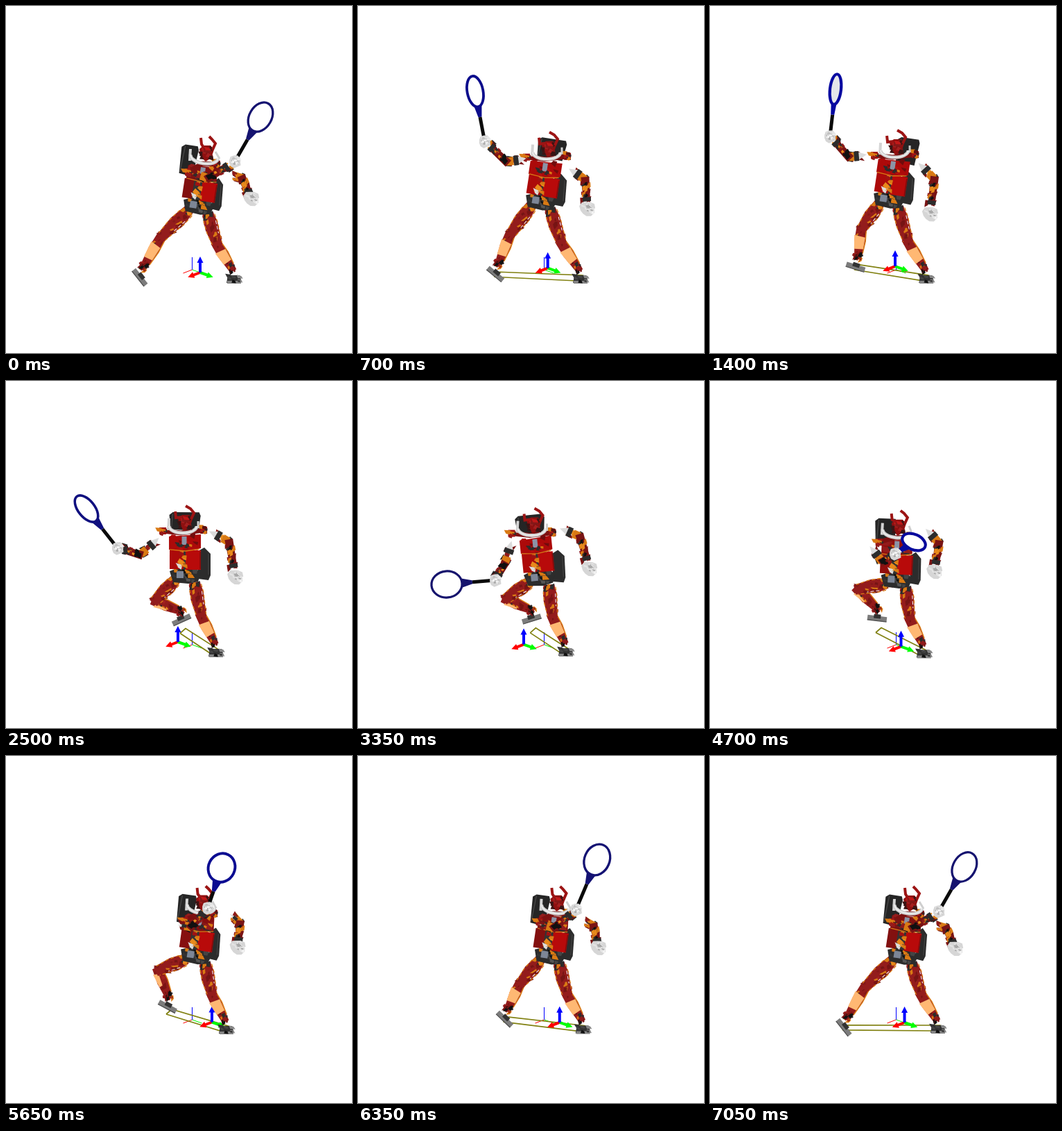
Animation, 499 px wide and 500 px high, one loop 7.1 s. Source, as an HTML page with a canvas:

```html
<!DOCTYPE html>
<html>
<head>
<meta charset="utf-8">
<style>
html, body { margin: 0; width: 100%; height: 100%; overflow: hidden; background: #fff; }
canvas { display: block; }
</style>
</head>
<body>
<canvas id="stage" width="499" height="500"></canvas>
<script>
const ctx = document.getElementById('stage').getContext('2d');
const LOOP = 7100, STEP = 50;
const mix = (a, b, k) => a + (b - a) * k;
const clamp = k => Math.max(0, Math.min(1, k));
const wave = (t, peak, period = LOOP) => Math.cos((t - peak) / period * 2 * Math.PI);
const add = (p, x, y) => [p[0] + x, p[1] + y];
const lerp = (p, q, k) => [mix(p[0], q[0], k), mix(p[1], q[1], k)];

// Periodic monotone spline through keys of [time, ...values].
function track(...keys) {
  const n = keys.length;
  const key = i => keys[(i + n) % n];
  const time = i => key(i)[0] + LOOP * Math.floor(i / n);
  const rate = (i, c) => (key(i + 1)[c] - key(i)[c]) / (time(i + 1) - time(i));
  const slope = (i, c) => {
    const a = rate(i - 1, c), b = rate(i, c);
    return a * b <= 0 ? 0 : 2 * a * b / (a + b);
  };
  return t => {
    let i = n - 1;
    while (keys[i][0] > t) i--;
    const d = time(i + 1) - time(i), k = (t - time(i)) / d;
    return keys[i].slice(1).map((v, j) =>
      mix(v, key(i + 1)[j + 1], k * k * (3 - 2 * k)) +
      d * k * (1 - k) * ((1 - k) * slope(i, j + 1) - k * slope(i + 1, j + 1)));
  };
}

// The few driven points; every other joint follows from them.
const pelvisAt = track([0, 276, 288], [1100, 256, 279], [2500, 257, 280], [4000, 264, 286]);
const leanAt = track([0, 12], [1400, 12], [3350, -8], [5650, 11]);
const sideAt = track([0, -25], [1100, 18], [2500, 1], [3350, -4], [5500, -23]);
const shoulderAt = track([0, 266, 240], [1100, 220, 214], [2500, 215, 232], [4700, 236, 244]);
const fistAt = track([0, 354, 277], [1200, 317, 300], [2500, 331, 282], [3350, 334, 270], [4700, 324, 274]);
const handAt = track([0, 330, 224], [650, 184, 196], [1400, 173, 188], [2500, 161, 241],
  [3350, 198, 287], [4700, 267, 249], [5650, 291, 219]);
const aimAt = track([0, 37, -64], [650, -14, -72], [1400, 8, -68], [2500, -45, -57],
  [3350, -70, 6], [3850, 14, 26], [4700, 27, -17], [5650, 20, -58], [6400, 31, -72]);
const minorAt = track([0, 16], [1400, 8], [2500, 12], [3350, 19], [4700, 11], [5650, 19]);
const footLAt = track([0, 193, 391], [1400, 210, 376], [2500, 253, 344], [4700, 241, 342], [5650, 233, 361]);
const footRAt = track([0, 329, 394], [1200, 314, 394], [3350, 300, 391], [5650, 318, 395]);
const tiltAt = track([0, .9], [1400, .3], [2500, -.43], [4700, .12]);
const massAt = track([0, 280], [1400, 267], [3350, 239], [5650, 297]);

// Knee of a leg with two equal bones, bending towards screen left.
function knee(hip, ankle) {
  const dx = ankle[0] - hip[0], dy = ankle[1] - hip[1], d = Math.hypot(dx, dy);
  const bone = Math.max(45, d * .505), h = Math.sqrt(bone * bone - d * d / 4);
  return add(lerp(hip, ankle, .5), -dy / d * h, dx / d * h);
}

function pose(t) {
  const pelvis = pelvisAt(t), head = add(pelvis, leanAt(t)[0], -78);
  const side = sideAt(t)[0], front = clamp((side + 25) / 20);
  const armR = add(head, 42 - 5 * wave(t, 450), 21 + 14 * wave(t, 450));
  const armL = shoulderAt(t), hand = handAt(t), fist = fistAt(t);
  const reach = Math.hypot(hand[0] - armL[0], hand[1] - armL[1]);
  const sag = 15 * Math.abs(hand[0] - armL[0]) / reach;
  const footL = footLAt(t), footR = footRAt(t);
  const lift = Math.max(0, 375 - footL[1]) / 2;
  return {
    pelvis, head, side, front, armL, armR, hand, fist, footL, footR,
    elbowL: add(lerp(armL, hand, .4), 0, sag),
    elbowR: add(lerp(armR, fist, .3), (fist[1] - armR[1]) * .2, (armR[0] - fist[0]) * .2),
    hipL: add(pelvis, -11, 5), hipR: add(pelvis, 15, 10),
    ankleL: add(footL, 3, -11), ankleR: add(footR, -1, -12),
    tilt: tiltAt(t)[0],
    mass: [massAt(t)[0], pelvis[1] + 96],
    area: [add(footL, -2, lift + 4), add(footL, 6, lift - 3), add(footR, 2, -6), add(footR, -6, 2)],
    aim: aimAt(t), minor: minorAt(t)[0],
    bright: .5 + .5 * wave(t, 1450, LOOP / 2)
  };
}

function rng(seed) {
  return () => (seed = (seed * 16807 + 11) % 2147483647) / 2147483647;
}

function poly(color, ...pts) {
  ctx.fillStyle = color;
  ctx.beginPath();
  pts.forEach(p => ctx.lineTo(...p));
  ctx.fill();
}

function line(color, width, ...pts) {
  ctx.strokeStyle = color;
  ctx.lineWidth = width;
  ctx.beginPath();
  pts.forEach(p => ctx.lineTo(...p));
  ctx.stroke();
}

function box(color, x, y, rx, ry) {
  ctx.fillStyle = color;
  ctx.fillRect(x - rx, y - ry, 2 * rx, 2 * ry);
}

function within(p, angle, paint) {
  ctx.save();
  ctx.translate(...p);
  ctx.rotate(angle);
  paint();
  ctx.restore();
}

// Runs paint(length) with the x axis along the bone.
function bone(a, b, paint) {
  const dx = b[0] - a[0], dy = b[1] - a[1];
  within(a, Math.atan2(dy, dx), () => paint(Math.hypot(dx, dy)));
}

// Small mesh facets scattered over a box.
function chips(x, y, rx, ry, count, seed, colors, size = 5) {
  const r = rng(seed * 7919);
  r();
  for (let i = 0; i < count; i++) {
    const cx = x + mix(-rx, rx, r()), cy = y + mix(-ry, ry, r()), s = size * (.5 + r() * .8);
    poly(colors[Math.floor(r() * colors.length)],
      [cx - s * r(), cy - s / 2], [cx + s / 2, cy - s * r() / 2],
      [cx + s * r(), cy + s / 2], [cx - s / 2, cy + s * r() / 2]);
  }
}

const RED = '#931c1c', ORANGE = '#d97a14', DARK = '#2c2c2c', PEACH = '#ffb873';
const REDS = [RED, '#761414', '#a32020', '#841818'];
const LEG = [...REDS, ...REDS, ORANGE, DARK];
const JOINT = [DARK, '#111', ORANGE, '#e88a1c', '#7a1414', '#8f1b1b'];
const BLACKS = ['#111', '#333', '#444', '#555'];

function thigh(hip, end, seed) {
  bone(hip, end, len => {
    poly(RED, [0, -7], [len * .3, -10], [len + 3, -8], [len + 4, 6], [len * .5, 10], [0, 8]);
    chips(len / 2, 0, len * .48, 8, 18, seed, LEG, 6);
    ctx.setLineDash([5, 3]);
    line(ORANGE, 1.3, [4, -9], [len * .35, -10], [len, -8]);
    line(ORANGE, 1.3, [len * .2, 9], [len * .6, 9], [len, 6]);
    line('#fff', 1, [len * .3, -8], [len * .7, -7]);
    ctx.setLineDash([]);
    chips(0, 0, 6, 6, 10, seed + 1, JOINT);
  });
}

// The light shin plate turns edge-on as the leg folds (bent: 0 to 1).
function shin(top, ankle, seed, bent) {
  bone(top, ankle, len => {
    poly(RED, [-4, -7], [len * .35, -8], [len, -5], [len, 5], [len * .4, 8], [-4, 7]);
    chips(len / 2, 0, len / 2, 6, 20, seed, [...LEG, ...JOINT]);
    line(ORANGE, 1.5, [0, -7], [len * .4, -8], [len * .8, -6]);
    const from = mix(.28, .08, bent), low = mix(-7, 4, bent);
    poly(PEACH, [len * from, low], [len * (from + .38), low + 1],
      [len * (from + .4), 7], [len * from - 2, 9]);
    chips(len * .88, 0, len * .12, 5, 9, seed + 2, JOINT);
  });
}

function leg(hip, ankle, seed) {
  const k = knee(hip, ankle), span = Math.hypot(ankle[0] - hip[0], ankle[1] - hip[1]);
  shin(k, ankle, seed, clamp((85 - span) / 30));
  thigh(hip, k, seed + 4);
}

function feet(p) {
  within(p.footL, p.tilt, () => {
    box('#7c7c7c', 0, 0, 14, 3.5);
    line('#4a4a4a', 1.2, [-14, 3.5], [14, 3.5]);
    box('#333', 0, -3, 5, 3);
  });
  within(p.footR, 0, () => {
    poly('#333', [-9, -6], [8, -6], [11, 4], [-11, 5]);
    box('#858585', 0, 4, 10, 2);
    chips(0, -1, 8, 4, 9, 81, [...BLACKS, '#888'], 5);
  });
}

function blob(p, radius, seed) {
  within(p, 0, () => {
    const r = rng(seed * 331), pts = [];
    for (let a = 0; a < 2 * Math.PI; a += .57) {
      const d = radius * (.84 + r() * .3);
      pts.push([d * Math.cos(a), d * Math.sin(a)]);
    }
    poly('#d6d6d6', ...pts);
    chips(0, 0, radius * .6, radius * .6, 16, seed, ['#f4f4f4', '#e4e4e4', '#c2c2c2', '#a8a8a8'], 5);
  });
}

function arm(a, elbow, hand, cone, seed) {
  bone(a, elbow, len => {
    chips(len / 2 + 3, 0, len / 2 - 1, 5, 16, seed, JOINT, 7);
    box(ORANGE, len * .75, 0, 5, 6);
    poly('#dcdcdc', [-8 * cone, 1], [5, -6 * cone], [5, 6 * cone]);
    box(DARK, 7, 0, 3.5, 7 * cone);
  });
  bone(elbow, hand, len => {
    poly('#7a1414', [-4, -6], [len * .7, -5], [len * .7, 5], [-4, 6]);
    chips(len * .4, 0, len * .4, 6, 18, seed + 5, JOINT, 6);
    box(DARK, len * .68, 0, 3, 6);
  });
}

function axes(o, width) {
  [['#f00', -13, 5], ['#0f0', 14, 5], ['#00f', 0, -18]].forEach(([color, x, y]) => {
    const end = add(o, x, y);
    line(color, width, o, end);
    if (width > 1) bone(o, end, len => poly(color, [len - 4, -4.5], [len + 5, 0], [len - 4, 4.5]));
  });
}

function packs(p, lean) {
  const off = Math.abs(p.side), w = 23 - off * .42, h = 13 + off * .36;
  within(add(p.head, p.side, off / 2), lean, () => {
    poly('#252525', [-w, 4 - h], [5 - w, -h], [w - 2, -h], [w, 5 - h], [w - 3, h], [2 - w, h - 2]);
    line('#484848', 1.3, [5 - w, 2 - h], [3 - w, h - 4]);
  });
  within(add(p.pelvis, 29, -16), lean / 2, () => {
    const r = mix(7, 9, p.front);
    poly(DARK, [-r, -19], [0, -24], [r, -15], [r, 16], [r - 3, 23], [-r, 21]);
    line('#454545', 1, [r - 3, -15], [r - 3, 15]);
  });
}

function torso(p, lean) {
  const turn = (a, b) => mix(a, b, p.front);
  const red = `rgb(${turn(130, 172)},${turn(16, 10)},${turn(16, 10)})`;
  within(p.pelvis, lean, () => {
    poly(DARK, [-21, -6], [-8, -11], [17, -10], [24, -3], [20, 9], [6, 12], [-16, 10]);
    chips(0, 0, 17, 8, 16, 41, [...BLACKS, ORANGE], 6);
    box('#333', 0, -27, 14, 18);
    box(red, turn(-17, -11), -23, turn(7, 10), 14);
    box('#b80a0a', 13, -22, 11, 14);
    line('#800c0c', 1.5, [23, -34], [23, -9]);
    chips(-3, -24, 5, 13, 14, 43, [ORANGE, '#e88a1c', '#ddd', DARK, '#a01212'], 6);
    poly(red, [-22, -56], [turn(20, 24), -59], [turn(22, 24), -39], [10, -36], [-22, -37]);
    chips(0, -48, 20, 9, 18, 47, p.front > .6 ? [red, '#8b0f0f', '#b41010', '#700c0c'] : [...REDS, DARK, ORANGE], 8);
    line(ORANGE, 1.3, [-21, -37], [2, -35], [22, -38]);
    box('#8b93a6', 0, -50, 3.5, 6);
    box('#7d8696', -6, -1, 5, 5);
    chips(0, -42, 10, 4, 7, 53, [ORANGE, DARK], 5);
  });
}

function bust(p) {
  const turn = (a, b) => mix(a, b, p.front);
  within(p.head, 0, () => {
    const left = [turn(-25, -31), turn(29, 14)], right = [turn(16, 28), turn(18, 13)];
    line('#7d1010', 7, left, [-5, 17], right);
    [left, right].forEach((q, i) => {
      box('#a01414', ...q, 5, 5);
      chips(...q, 5, 5, 6, 61 + i, [RED, '#5a1010', DARK, ORANGE], 5);
    });
    line('#d4d4d4', 4, [-22, -4], [-23, 13]);
    line('#cfcfcf', 3, [turn(14, 20), 0], [20, 10]);
    ctx.beginPath();
    ctx.ellipse(-2, 7, 20, 10, turn(.15, 0), 0, Math.PI);
    for (const [color, width] of [['#cfcfcf', 5], ['#f2f2f2', 1.5]]) {
      ctx.strokeStyle = color;
      ctx.lineWidth = width;
      ctx.stroke();
    }
    poly('#8f1010', [-9, -4], [-3, -9], [7, -9], [12, -3], [8, 9], [0, 14], [-7, 8]);
    chips(0, 2, 8, 8, 18, 71, [...REDS, '#c01818', '#3a1414'], 6);
    const tip = turn(-7, -13), rise = turn(-20, -14);
    line('#9c1414', 4, [tip, rise], [tip + 1, rise + 9], [-3, -6]);
    line('#9c1414', 4, [turn(5, 2), -22], [9, -18], [14, -12], [10, -3]);
  });
}

function racket(p) {
  const len = Math.hypot(...p.aim), dir = Math.atan2(p.aim[1], p.aim[0]);
  const blue = `rgb(${mix(22, 6, p.bright)},${mix(20, 8, p.bright)},${mix(108, 160, p.bright)})`;
  // The hoop rolls away from the handle line when seen foreshortened.
  const roll = Math.max(0, 1 - len / 66) * 1.9;
  const minor = p.minor, major = Math.max(minor, 14 + len * .115);
  const edge = len - 1 / Math.hypot(Math.cos(roll) / major, Math.sin(roll) / minor);
  within(p.hand, dir, () => {
    const neck = Math.max(2, edge - 15), half = Math.min(7, minor / 2);
    line('#0a0a0a', 5, [0, 0], [neck, 0]);
    poly(blue, [neck, -2.5], [edge + 2, -half], [edge, 0], [edge + 2, half], [neck, 2.5]);
  });
  ctx.beginPath();
  ctx.ellipse(...add(p.hand, ...p.aim), major, minor, dir + roll, 0, 7);
  ctx.fillStyle = minor < 10 ? '#e6e6ea' : '#fff';
  ctx.fill();
  ctx.strokeStyle = blue;
  ctx.lineWidth = mix(3.2, 4.2, p.bright);
  ctx.stroke();
}

function draw(t) {
  const p = pose(t), cone = clamp(p.front * 4);
  const lean = Math.atan2(p.head[0] - p.pelvis[0], 78);
  ctx.fillStyle = '#fff';
  ctx.fillRect(0, 0, 499, 500);

  axes([268.5, 380], 1);
  if (t >= STEP) line('#808010', 1.7, ...p.area, p.area[0]);
  axes(p.mass, 4);

  feet(p);
  leg(p.hipL, p.ankleL, 21);
  leg(p.hipR, p.ankleR, 27);
  arm(p.armR, p.elbowR, p.fist, cone, 31);
  blob(p.fist, 11, 33);
  packs(p, lean);
  torso(p, lean);
  bust(p);
  arm(p.armL, p.elbowL, p.hand, cone, 35);
  racket(p);
  blob(p.hand, 9, 37);
}

function tick() {
  draw(Math.floor(performance.now() % LOOP / STEP) * STEP);
  requestAnimationFrame(tick);
}
tick();
</script>
</body>
</html>
```
